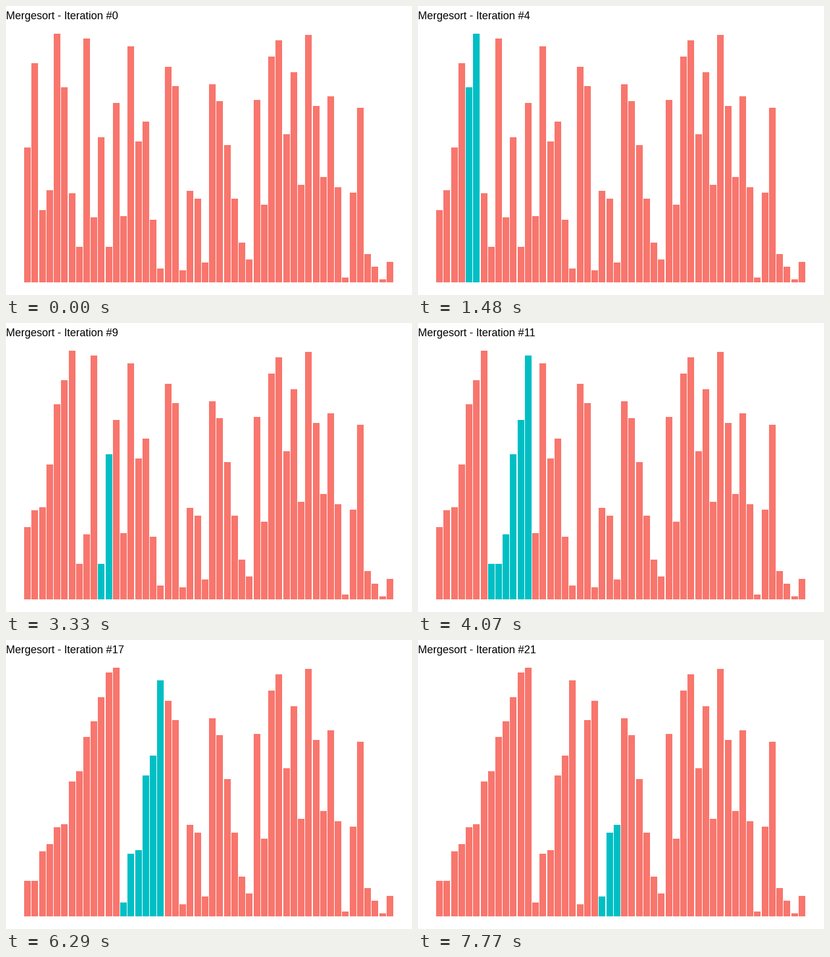
A matplotlib script for the animation above (8 s loop, 672x480 px).

```python
import itertools
import math

import matplotlib.pyplot as plt
import numpy as np
from matplotlib.animation import FuncAnimation

W, H, DPI = 672, 480, 96
LOOP, TICK, HOLD = 8000, 20, 370
BASE = 459
LEFT, PITCH, BAR = 30.55, 12.2427, 11
FONT_PX = 17.9
IDLE, ACTIVE = "#F8766D", "#00BFC4"

# Key heights of the unsorted bars; a gap is eased between its neighbours.
GAP = math.nan
KEYS = [
    224, 364, 120, 153, 413, GAP, GAP, 59, 405, 108, 241, 59, 298,
    110, 392, 234, 267, 104, 23, 358, 326, 20, 152, 139, 33,
    329, GAP, GAP, GAP, GAP, 38, 303, 129, 375, 402, 246, 349, 162,
    411, GAP, 175, 309, GAP, 8, GAP, 290, 47, GAP, 5, 34,
]


def fill_gaps(keys):
    keys = np.array(keys)
    known = np.flatnonzero(~np.isnan(keys))
    order = np.arange(len(known))
    pos = np.interp(np.arange(len(keys)), known, order)
    t = pos - np.floor(pos)
    eased = np.floor(pos) + (1 - np.cos(np.pi * t)) / 2
    return np.rint(np.interp(eased, order, keys[known])).astype(int).tolist()


def merges(lo, hi):
    """Yield the inclusive range of every merge, in the order it happens."""
    if lo < hi:
        mid = (lo + hi) // 2
        yield from merges(lo, mid)
        yield from merges(mid + 1, hi)
        yield lo, hi


def build_states(values):
    states = [(values[:], range(0))]
    for lo, hi in itertools.islice(merges(0, len(values) - 1), LOOP // HOLD):
        values[lo:hi + 1] = sorted(values[lo:hi + 1])
        states.append((values[:], range(lo, hi + 1)))
    return states


STATES = build_states(fill_gaps(KEYS))

fig = plt.figure(figsize=(W / DPI, H / DPI), dpi=DPI, facecolor="white")
ax = fig.add_axes([0, 0, 1, 1])
ax.axis("off")
lefts = [int(LEFT + PITCH * i) for i in range(len(KEYS))]
bars = ax.bar(lefts, STATES[0][0], width=BAR, bottom=H - BASE, align="edge",
              color=IDLE, linewidth=0, antialiased=False)
ax.set(xlim=(0, W), ylim=(0, H))
title = ax.text(0, H - 22, "", family="Liberation Sans",
                fontsize=FONT_PX * 72 / DPI, color="black", va="baseline")


def update(frame):
    step = (frame * TICK + TICK // 2) // HOLD
    values, active = STATES[step]
    for i, (bar, value) in enumerate(zip(bars, values)):
        bar.set_height(value)
        bar.set_facecolor(ACTIVE if i in active else IDLE)
    title.set_text(f"Mergesort - Iteration #{step}")
    return [*bars, title]


anim = FuncAnimation(fig, update, frames=LOOP // TICK, interval=TICK,
                     init_func=lambda: update(0), repeat=True,
                     repeat_delay=0, blit=False)
plt.show()
```
